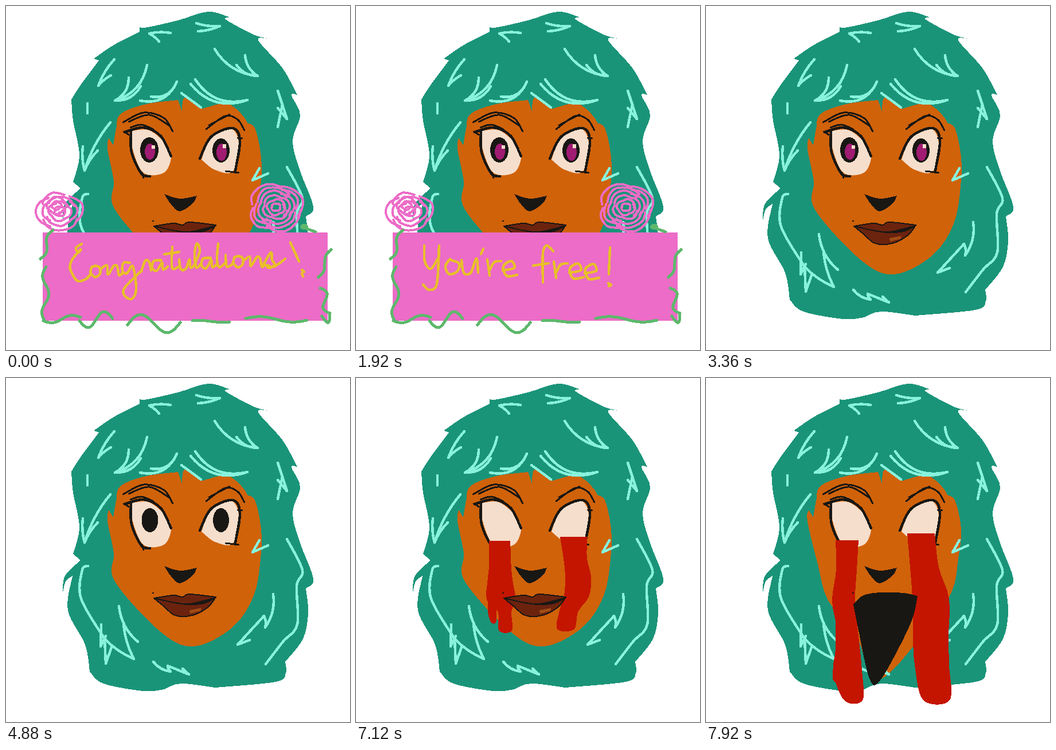
An HTML page for the animation above (8 s loop, 600 px wide and 600 px high).

```html
<!DOCTYPE html>
<html lang="en">
<head>
<meta charset="utf-8">
<title>Congratulations</title>
<style>
html, body { margin: 0; width: 100%; height: 100%; overflow: hidden; background: #fff; }
svg { display: block; width: 100vw; height: 100vh; shape-rendering: crispEdges; }
path { stroke-linecap: round; stroke-linejoin: round; }
.line { fill: none; stroke-width: 4.5; }
.thin { stroke-width: 3; }
.ink { stroke: #191714; }
.shine { stroke: #88f2dc; }
.gold { stroke: #e8bf2a; }
.vine { stroke: #5db86c; stroke-width: 5; }
.petal { stroke: #ec6cc7; stroke-width: 4; }
.hair { fill: #1a9479; }
.face { fill: #d0620a; }
.white { fill: #f5decb; }
.dark { fill: #191714; }
.purple { fill: #a01b72; }
.lips { fill: #6b230e; stroke-width: 2; }
.mouth { fill: #191714; stroke-width: 2; }
.red { fill: #c41500; }

/* one percent of the loop is one 80 ms step */
.sign, .hello, .free, .iris, .pupils, .pupil, .lid, .gloss, .blood, .drop { animation: 8s step-end infinite; }
.sign { animation-name: sign; }
.hello { animation-name: hello; }
.free { animation-name: free; }
.iris { animation-name: iris; }
.pupils { animation-name: pupils; }
.pupil { animation-name: shrink; transform-box: fill-box; transform-origin: center; }
.lid { animation-name: lid; transform-origin: 0 206px; }
.gloss { animation-name: gloss; }
.blood { animation-name: blood; }
.drop { animation-name: drop; }
.bar { stroke-dasharray: 1 2; animation: bar 8s infinite; }
.face { animation: face 8s infinite; }
.lips, .mouth { animation: open 8s infinite; }
.stream { animation: bleed 8s infinite; }

@keyframes sign { 0% { visibility: visible } 42%, to { visibility: hidden } }
@keyframes hello { 0% { opacity: 1 } 16%, to { opacity: 0 } }
@keyframes free { 0% { opacity: 0 } 24% { opacity: 1 } 36%, to { opacity: 0 } }
@keyframes iris { 0% { opacity: 1 } 61%, to { opacity: 0 } }
@keyframes pupils { 0% { opacity: 0 } 61% { opacity: 1 } 71%, to { opacity: 0 } }
@keyframes shrink { 0% { transform: scale(1) } 62% { transform: scale(.75) } 63%, to { transform: scale(.5) } }
@keyframes lid { 0% { transform: scaleY(0) } 69% { transform: scaleY(.5) } 70% { transform: scaleY(1) } 72% { transform: scaleY(.5) } 73%, to { transform: scaleY(0) } }
@keyframes gloss { 0% { opacity: 1 } 92%, to { opacity: 0 } }
@keyframes blood { 0% { visibility: hidden } 81%, to { visibility: visible } }
@keyframes drop { 0% { opacity: 0 } 93% { opacity: 1 } 94%, to { opacity: 0 } }
@keyframes bar { 0% { stroke-dashoffset: 1.02; animation-timing-function: steps(10) } 10%, to { stroke-dashoffset: 0 } }

/* the poses are set by the script */
@keyframes face {
  0%, 93% { d: var(--pose0); animation-timing-function: steps(6) }
  99%, to { d: var(--pose1) }
}
@keyframes open {
  0%, 91% { d: var(--pose0); animation-timing-function: steps(2) }
  93% { d: var(--pose1); animation-timing-function: steps(6) }
  99%, to { d: var(--pose2) }
}
@keyframes bleed {
  0%, 81% { d: var(--pose0); animation-timing-function: steps(12) }
  93% { d: var(--pose1); animation-timing-function: steps(6) }
  99%, to { d: var(--pose2) }
}
</style>
</head>
<body>
<svg viewBox="0 0 600 600">
  <clipPath id="eyes">
    <path data-shape="219,218 250,217 281,243 288,265 275,291 240,291 221,250 219,218"/>
    <path data-shape="341,268 357,230 392,214 406,240 396,288 365,286 341,268"/>
  </clipPath>

  <path class="hair" data-shape="233,31 240,38 300,25 352,10 391,20;384,24 432,50 458,57;440,60 482,108 508,155;498,156 513,190 500,235 512,285 536,350 523,367;527,410 518,455 487,495;488,515 470,530 365,540;305,533 276,543;240,546 170,533 146,512;138,465 108,405 116,345;104,355 99,375;103,345 130,318;117,307;128,260 117,200 114,163;130,138 162,95;153,92;188,68 233,45"/>
  <path class="face"/>

  <g clip-path="url(#eyes)">
    <rect class="white" x="210" y="205" width="205" height="95"/>
    <g class="iris">
      <ellipse class="dark" cx="250" cy="251" rx="16" ry="22"/>
      <ellipse class="dark" cx="375" cy="252" rx="15" ry="21"/>
      <ellipse class="purple" cx="251" cy="254" rx="9" ry="14"/>
      <ellipse class="purple" cx="376" cy="255" rx="9" ry="15"/>
      <path class="white" d="M254 243h6v6h-6zM378 241h6v7h-6z"/>
    </g>
    <g class="pupils">
      <ellipse class="dark pupil" cx="251" cy="248" rx="14.5" ry="21"/>
      <ellipse class="dark pupil" cx="375" cy="248" rx="14" ry="21"/>
    </g>
    <path class="lid ink" d="M200 206H420V294H200Z" fill="#d0620a" stroke-width="4"/>
  </g>
  <path class="line ink" data-line="207,220 240,212 270,227 288,262;218,220 219,255 236,292 251,297;338,266 358,228 395,213 408,235 400,287"/>
  <path class="line ink thin" data-line="205,219 215,225;217,212 236,207 257,215;237,290 240,300;383,288 406,291;404,230 412,231;204,203 240,186 275,195 291,219;214,202 250,190 287,210;349,215 382,192 404,198 416,217;354,208 390,189"/>
  <path class="dark" data-shape="276,328 303,336 333,331;325,345 303,358 288,346 276,328"/>

  <g id="shine"></g>
  <g class="blood" id="blood">
    <ellipse class="red drop" cx="234.5" cy="517" rx="3" ry="17"/>
  </g>
  <path class="lips ink"/>
  <path class="mouth ink"/>
  <path class="gloss" fill="#a04c16" d="M320 405 340 401V406L321 411Z"/>
  <path class="dark" d="M255 374h3v2h-3z"/>

  <g class="sign">
    <g id="roses"></g>
    <path fill="#ec6cc7" d="M64 395H561V549H64Z"/>
    <g id="vines"></g>
    <ellipse cx="520" cy="385" rx="7" ry="5" fill="#5db86c"/>
    <g class="hello" id="hello">
      <path class="line gold bar" pathLength="1" data-line="349,431 365,424 389,418"/>
    </g>
    <g class="free" id="free"></g>
  </g>
</svg>
<script>
const points = text => text.split(' ').map(p => p.split(',').map(Number));

// Catmull-Rom curve through the points.
function smooth(pts) {
  let d = 'M' + pts[0];
  for (let i = 1; i < pts.length; i++) {
    const a = pts[i - 1], b = pts[i];
    const before = pts[i - 2] || a, after = pts[i + 1] || b;
    const c1 = a.map((v, k) => v + (b[k] - before[k]) / 6);
    const c2 = b.map((v, k) => v - (after[k] - a[k]) / 6);
    d += `C${c1} ${c2} ${b}`;
  }
  return d;
}

const lines = text => text.split(';').map(s => smooth(points(s))).join('');

// Closed outline: smooth runs that meet in sharp corners at each ";".
function shape(text) {
  let d = '', corner = [];
  for (const run of text.split(';')) {
    const pts = [...corner, ...points(run)];
    d += smooth(pts).slice(d ? ('M' + pts[0]).length : 0);
    corner = [pts.at(-1)];
  }
  return d + 'Z';
}

function add(id, className, d) {
  const path = document.createElementNS('http://www.w3.org/2000/svg', 'path');
  path.setAttribute('class', className);
  path.setAttribute('d', d);
  document.getElementById(id).append(path);
  return path;
}

function pose(path, ...outlines) {
  outlines.forEach((d, i) => path.style.setProperty('--pose' + i, `path("${d}")`));
}

for (const path of document.querySelectorAll('[data-line]')) path.setAttribute('d', lines(path.dataset.line));
for (const path of document.querySelectorAll('[data-shape]')) path.setAttribute('d', shape(path.dataset.shape));

// Face and mouth
const face = jaw => shape(`179,230 187,243;192,215 200,188 245,171 300,164;307,184;312,160 343,179;385,170 412,190 421,204;435,215 445,265 ${jaw} 177,250 179,230`);
pose(document.querySelector('.face'),
  face('444,315 432,380 395,435 328,468 270,443 190,355 188,305'),
  face('440,315 428,374 380,445 300,526 262,450 213,388 195,325'));

const scream = shape('258,395 275,380 305,375 345,376 368,381;355,430 305,524 286,524 267,440 258,395');
pose(document.querySelector('.lips'),
  shape('258,384 292,379 308,382 320,377 366,382;352,400 325,414 295,414 275,398 258,384'),
  shape('276,388 308,372 322,370 340,373 369,376;355,408 325,427 300,422 283,407 276,388'),
  scream);
pose(document.querySelector('.mouth'),
  shape('258,384 272,387 290,391 320,394 366,383;345,393 320,395 300,393 280,389 258,384'),
  shape('285,398 300,388 320,379 340,378 364,374;360,392 345,408 315,417 297,409 285,398'),
  scream);

// A stream runs through "x,y,halfWidth" rows; it starts as a thin smear at its top.
function stream(early, late) {
  const outline = rows => shape(
    rows.map(([x, y, w]) => `${x - w},${y}`).join(' ') + ' ' +
    rows.map(([x, y, w]) => `${x + w},${y}`).reverse().join(' ') + `;${rows[0][0] - rows[0][2]},${rows[0][1]}`);
  const rows = points(early), [x0, y0, w0] = rows[0];
  const smear = rows.map(([, y]) => [x0 + 2, y0 + 4 + (y - y0) * 0.03, w0 * 0.65]);
  pose(add('blood', 'red stream', ''), outline(smear), outline(rows), outline(points(late)));
}
stream('250,283,21 251,345,22 251,385,26 254,435,31 263,465,11 265,514,10',
       '246,283,20 245,335,18 240,390,20 248,450,18 247,510,25 257,562,16');
stream('248,287,8 236,380,8 231,455,9 235,490,4',
       '246,287,8 236,400,9 234,470,8 230,525,9');
stream('379,276,27 383,330,22 391,380,25 386,430,24 366,468,16 358,514,13',
       '375,271,24 381,330,25 392,385,32 392,450,31 394,500,30 402,562,23');

// Strands of hair that meet in one tip, each bent to the side.
function fan(tip, bend, ends) {
  const [x, y] = points(tip)[0];
  const d = points(ends).map(([ex, ey]) => {
    const cx = (x + ex) / 2 + bend * (ey - y), cy = (y + ey) / 2 - bend * (ex - x);
    return `M${x} ${y}Q${cx} ${cy} ${ex} ${ey}`;
  });
  add('shine', 'line shine', d.join(''));
}
fan('250,48', 0.1, '287,47 267,62');
fan('373,35', 0.1, '332,30 335,44');
fan('439,122', 0.25, '364,75 402,103 417,86');
fan('161,139', 0.1, '189,93 183,121');
fan('190,165', -0.3, '246,103 214,125 235,140');
fan('298,132', 0.4, '234,165 253,158');
fan('340,177', 0, '306,152');
fan('421,164', 0.35, '322,136 330,128');
fan('142,187', 0, '142,170');
fan('137,287', 0.1, '182,203 134,245 160,252');
fan('474,178', 0, '490,197');
fan('482,172', 0, '474,148 490,197 474,211');
fan('430,304', 0, '442,283 457,292');
fan('165,468', 0, '166,430 174,450');
fan('174,498', 0, '172,455 184,470');
fan('230,460', 0.2, '197,398');
fan('223,490', 0.1, '205,430 172,455');
fan('319,517', 0, '282,502 308,507');
fan('287,512', 0.2, '257,495 282,502');
fan('452,435', -0.2, '466,377 450,415');
fan('404,465', 0, '450,415 425,457');
add('shine', 'line shine', lines('490,281 517,335 507,362 508,430 483,460 453,499;143,328 133,335 131,385 172,455'));

// Roses: rings of loose arcs.
let seed = 7;
const random = () => (seed = seed * 16807 % 2147483647) / 2147483647;

function rose(x, y, rx, ry, rings) {
  for (let ring = 1; ring <= rings; ring++) {
    const turn = random() * 6.28;
    for (let petal = 0; petal < 4; petal++) {
      const start = turn + petal * 1.57, sweep = 1.3 + random() * 0.8;
      const arc = Array.from({ length: 6 }, (_, i) => {
        const r = ring / rings * (0.82 + 0.15 * Math.sin(i * 0.63) + 0.06 * random());
        const angle = start + sweep * i / 5;
        return [x + rx * r * Math.cos(angle), y + ry * r * Math.sin(angle)];
      });
      add('roses', 'line petal', smooth(arc));
    }
  }
}
rose(94, 358, 41, 34, 4);
rose(88, 348, 17, 15, 2);
rose(471, 351, 49, 43, 6);

// Vines: waves along a straight line.
function vine(x, y, dx, dy, height, waves) {
  const length = Math.hypot(dx, dy), n = Math.ceil(waves * 8);
  const wave = Array.from({ length: n + 1 }, (_, i) => {
    const u = i / n, side = height * Math.sin(u * waves * 2 * Math.PI) / length;
    return [x + dx * u + dy * side, y + dy * u - dx * side];
  });
  add('vines', 'line vine', smooth(wave));
}
vine(82, 391, -22, 50, -5, 1);
vine(70, 455, -2, 95, -6, 1.5);
vine(65, 549, 65, -6, -5, 1);
vine(128, 549, 58, -4, -13, 1);
vine(212, 556, 92, -4, 17, 1);
vine(325, 549, 65, 2, 1, 1);
vine(418, 545, 107, 3, 4, 1);
vine(567, 425, -22, 48, -4, 1);
vine(548, 492, 17, 44, 8, 1);
vine(551, 541, 14, -4, -14, 0.5);
vine(518, 386, 22, 8, 0, 1);

// Handwriting: each letter has its advance and its strokes from the baseline.
const script = {
  C: [35, '20,-64 10,-57 14,-49 18,-54 3,-36 0,-20 12,0 26,-2 35,-10'],
  o: [19, '0,-6 3,-18 15,-18 17,-6 8,0 0,-8'],
  n: [36, '0,-12 10,-18 12,-2 22,-17 28,-16 31,-1 37,-4'],
  g: [34, '14,-18 3,-18 1,-4 9,0 19,-12 25,28 17,45 4,38 6,24 34,-4'],
  r: [18, '0,0 7,-19 14,-16 17,-2'],
  a: [28, '17,-18 4,-17 1,-5 9,0 18,-14 20,-2 28,-7'],
  t: [20, '8,-40 7,-10 10,-1 20,-6;-6,-27 20,-31'],
  u: [26, '0,-17 3,0 12,-1 18,-17 20,-3 27,-7'],
  l: [12, '0,-6 10,-30 5,-44 1,-25 4,-2 12,-8'],
  T: [15, '2,-42 0,-15 4,-1 14,-8'], // crossed later
  i: [13, '0,-22 2,-2 12,-6'],
  s: [40, '-2,-4 11,-25 13,-12 18,-4 8,2 4,-3 16,0 36,-14'],
  '!': [0, '0,-42 15,-9;20,6 24,9 20,12 22,17']
};
const print = {
  Y: [37, '0,-48 1,-20 12,-8 26,-30;26,-48 22,18 9,29 -2,20'],
  o: [28, '8,-26 0,-14 6,0 20,-4 24,-18 7,-25'],
  u: [33, '0,-25 4,-3 16,-3 26,-28 29,-3'],
  "'": [12, '5,-46 1,-37'],
  r: [27, '0,-28 4,0;4,-9 12,-23 24,-25'],
  e: [27, '0,-10 20,-14 15,-26 1,-17 7,0 25,-2'],
  f: [36, '35,-45 24,-55 17,-42 17,9;0,-20 27,-24'],
  '!': [0, '2,-56 0,-10;-1,6 4,9 0,11']
};

function write(id, letters, text, x, baseline) {
  for (const letter of text) {
    const [advance, strokes] = letters[letter];
    const path = add(id, 'line gold', lines(strokes));
    path.setAttribute('transform', `translate(${x} ${baseline(x)})`);
    x += advance;
  }
}
const rising = x => 453 + 26 * Math.exp((112 - x) / 130);
const falling = x => 466 + (x - 119) / 28;
write('hello', script, 'CongratulaTions', 112, rising);
write('hello', script, '!', 496, rising);
write('free', print, "You're", 119, falling);
write('free', print, 'free', 309, falling);
write('free', print, '!', 441, falling);
</script>
</body>
</html>
```
